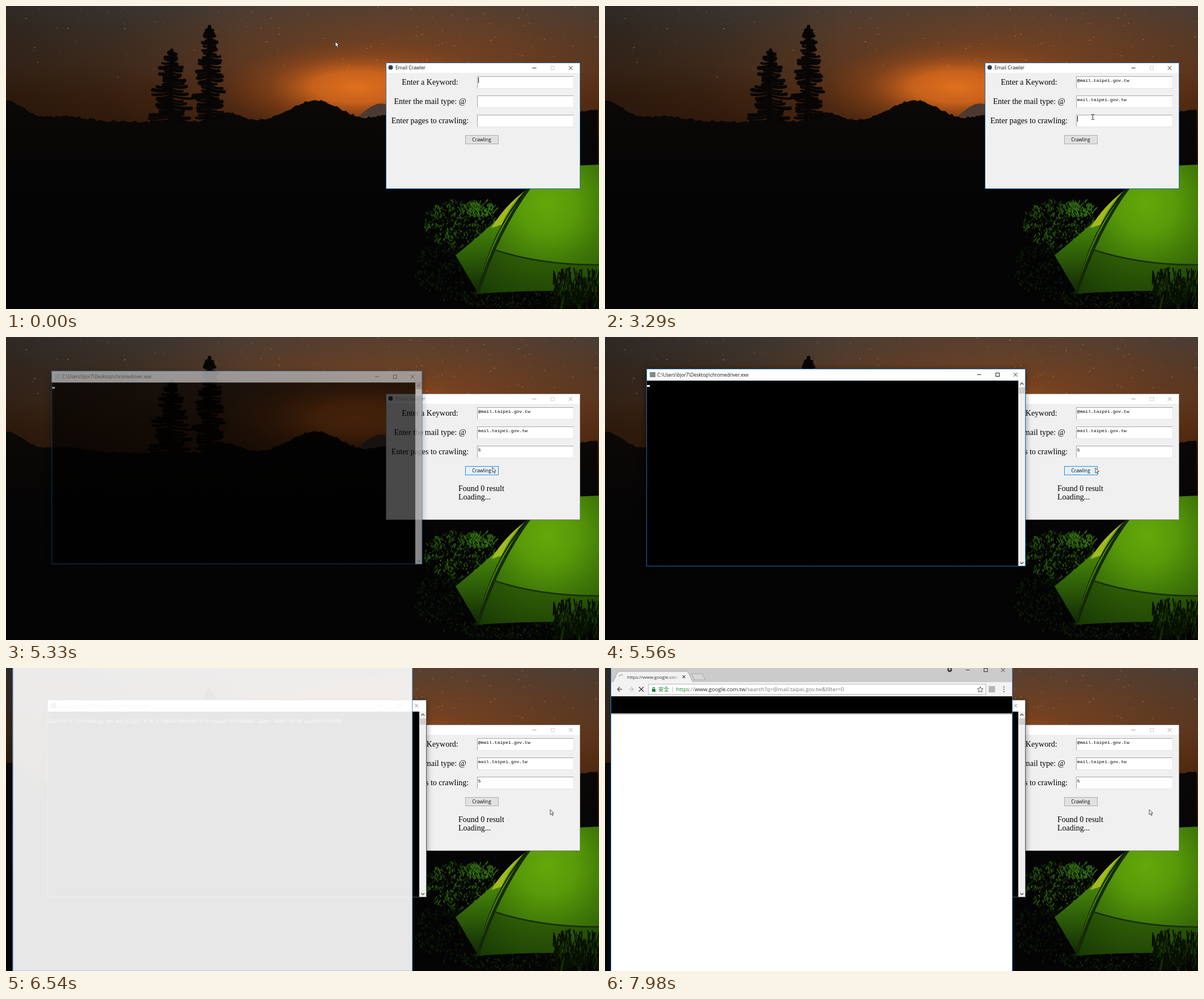
An HTML page with a canvas that plays this animation: 1046 px wide and 535 px high, repeating every 8000 ms.

```html
<!DOCTYPE html>
<html lang="en">
<head>
<meta charset="utf-8">
<title>Email Crawler</title>
<style>
html, body { margin: 0; width: 100%; height: 100%; overflow: hidden; background: #000; }
canvas { display: block; }
</style>
</head>
<body>
<canvas id="stage" width="1046" height="535"></canvas>
<script>
const W = 1046, H = 535, LOOP = 8000;
const SANS = '"Open Sans", sans-serif', SERIF = '"Liberation Serif", serif',
      MONO = '"Liberation Mono", monospace', CJK = '"Noto Sans CJK TC", "Noto Sans CJK", sans-serif';
const screen = document.getElementById('stage').getContext('2d');
let g = screen;

let seed = 7;
const rnd = (a = 0, b = 1) => {
  seed = (seed * 16807) % 2147483647;
  return a + (b - a) * seed / 2147483647;
};
const between = (v, a, b) => v >= a && v < b;
const smooth = p => p * p * (3 - 2 * p);

// ---- drawing helpers ----
function rect(x, y, w, h, fill) {
  g.fillStyle = fill;
  g.fillRect(x, y, w, h);
}
function frame(x, y, w, h, color) {
  g.strokeStyle = color;
  g.lineWidth = 1;
  g.strokeRect(x + .5, y + .5, w - 1, h - 1);
}
function shape(path, fill) {
  g.fillStyle = fill;
  g.fill(new Path2D(path));
}
function stroke(path, color, width = 1) {
  g.strokeStyle = color;
  g.lineWidth = width;
  g.stroke(new Path2D(path));
}
function arc(x, y, r, from, to, color, width = 1.2) {
  g.beginPath();
  g.arc(x, y, r, from, to);
  g.strokeStyle = color;
  g.lineWidth = width;
  g.stroke();
}
function disc(x, y, r, fill) {
  g.beginPath();
  g.arc(x, y, r, 0, 7);
  g.fillStyle = fill;
  g.fill();
}
function text(s, x, y, font, color, align = 'left') {
  g.font = font;
  g.fillStyle = color;
  g.textAlign = align;
  g.fillText(s, x, y);
  return x + g.measureText(s).width;
}
function cross(x, y, r, color, width = 1) {
  stroke(`M${x - r} ${y - r}l${2 * r} ${2 * r}m0 ${-2 * r}l${-2 * r} ${2 * r}`, color, width);
}
function controls(x, y, color, maxColor = color, gap = 32) {
  stroke(`M${x - 3.5} ${y + .5}h7`, color);
  frame(x + gap - 3, y - 3, 7, 7, maxColor);
  cross(x + 2 * gap, y + .5, 3.3, color);
}
// colours spread evenly over a gradient
function blend(gradient, ...colors) {
  colors.forEach((c, i) => gradient.addColorStop(i / (colors.length - 1), c));
  return gradient;
}
const down = (y0, y1, ...colors) => blend(g.createLinearGradient(0, y0, 0, y1), ...colors);
const across = (x0, x1, ...colors) => blend(g.createLinearGradient(x0, 0, x1, 0), ...colors);
const radial = (x, y, r, ...colors) => blend(g.createRadialGradient(x, y, 0, x, y, r), ...colors);

// ---- wallpaper ----
function glow(x, y, rx, ry, ...colors) {
  g.save();
  g.translate(x, y);
  g.scale(1, ry / rx);
  disc(0, 0, rx, radial(0, 0, rx, ...colors));
  g.restore();
}
function tree(x, top, base, spread) {
  const ink = '#080605';
  g.lineCap = 'round';
  stroke(`M${x} ${top}L${x - 4} ${base}`, ink, 6);
  for (let y = top + 6; y < base; y += 6) {
    for (const side of [-1, 1]) {
      const w = side * spread * Math.pow((y - top) / (base - top), .5) * rnd(.45, 1.05);
      stroke(`M${x} ${y - 3}q${w / 2} 5 ${w} ${rnd(1, 5)}`, ink, rnd(4, 7));
    }
  }
  g.lineCap = 'butt';
}
// hills as [centre, width, height]
const HILLS = [[0, 48, 36], [110, 45, 9], [390, 28, 17], [545, 60, 38], [690, 50, 12], [1040, 60, 20]];
function ridge() {
  let path = `M0 ${H}`;
  for (let x = 0; x <= W; x += 4) {
    const rise = HILLS.reduce((sum, [c, w, h]) => sum + h * Math.exp(-(((x - c) / w) ** 2)), 0);
    path += `L${x} ${204 - rise + rnd(-2, 2)}`;
  }
  shape(path + `L${W} ${H}`, down(165, 420, '#0b0806', '#060505', '#040404'));
}
function leaves(n, x, y, w, h, ...colors) {
  for (let i = 0; i < n; i++) {
    const a = rnd(0, 6.3), r = Math.sqrt(rnd()), len = rnd(2, 6);
    stroke(`M${x + w * r * Math.cos(a)} ${y + h * r * Math.sin(a)}l${rnd(-len, len)} ${-len}`, colors[i % colors.length], 2);
  }
}
function tent() {
  leaves(420, 800, 388, 64, 44, '#142c08', '#1f440c', '#2d5f10', '#0a1704');
  leaves(110, 835, 360, 30, 14, '#357012', '#28560e');
  leaves(150, 770, 465, 50, 45, '#0a1404', '#0e1c06');
  leaves(200, 900, 518, 130, 16, '#0a1404', '#13260a', '#0b1705');
  shape('M922 318Q880 370 793 440L832 506Q852 400 922 318', down(330, 500, '#5a9a0c', '#468509', '#2c5c08', '#142c05'));
  shape('M926 318L940 285L1046 280V505Q940 500 832 508Q852 400 926 318',
    radial(955, 350, 205, '#64a80a', '#589a09', '#417a08', '#2f5e07', '#1d4005'));
  shape('M862 431Q945 458 1046 457V505Q940 500 832 508Z', 'rgba(14,36,3,.35)');
  shape('M916 326Q880 352 856 392L874 386Q890 350 916 326', '#a2b91a');
  stroke('M924 320Q866 398 832 508', '#142a05', 5);
  stroke('M860 430Q945 458 1046 457', '#16300a', 2.5);
  for (let i = 0; i < 200; i++) {
    const x = rnd(965, 1055);
    stroke(`M${x} ${rnd(485, 540)}l${rnd(-9, 9)} ${-rnd(8, 32)}`, i % 5 ? '#081003' : '#152b06', 2.2);
  }
}
function wallpaper() {
  rect(0, 0, W, H, down(0, 215, '#423c38', '#463629', '#48301f', '#40230f', '#381c0c'));
  glow(720, 120, 560, 210, 'rgba(170,85,32,.6)', 'rgba(150,75,30,.3)', 'rgba(120,65,30,0)');
  glow(620, 143, 240, 84, '#e0701e', 'rgba(214,104,28,.85)', 'rgba(170,80,24,.35)', 'rgba(140,65,20,0)');
  rect(0, 0, 420, 230, across(0, 420, 'rgba(16,12,10,.4)', 'rgba(16,12,10,0)'));
  for (let i = 0; i < 150; i++) {
    stroke(`M${rnd(0, W)} ${rnd(0, 130)}l${rnd(.6, 3)} -.6`, `rgba(235,165,115,${rnd(.1, .6)})`, 1.2);
  }
  shape('M622 196Q645 172 662 172L700 180V200Z', '#4b3a31');
  ridge();
  tree(292, 78, 210, 44);
  tree(359, 36, 202, 32);
  tent();
}

// ---- form window ----
const MAIL = 'mail.taipei.gov.tw';
const inEntry = ({ x, y }) => between(x, 831, 1002) && between(y, 124, 214) && (y - 124) % 34 < 22;

function form(t, pos) {
  const active = t < 5230;
  rect(671, 100, 342, 223, '#f0f0f0');
  rect(671, 100, 342, 18, '#fff');
  frame(670, 100, 343, 223, active ? '#2b78b5' : '#8d8d8d');
  disc(678.5, 108.5, 4, '#30405c');
  text('Email Crawler', 687, 112, '8.3px ' + SANS, active ? '#111' : '#999');
  controls(932, 109, active ? '#222' : '#a0a0a0', '#d2d2d2');

  const label = '14px ' + SERIF;
  ['Enter a Keyword:', 'Enter the mail type: @', 'Enter pages to crawling:']
    .forEach((s, i) => text(s, 748, 139 + 34 * i, label, '#000', 'center'));

  const values = [t < 1370 ? '' : t < 1970 ? '@' : '@' + MAIL, t < 2690 ? '' : MAIL, t < 3920 ? '' : '5'];
  const row = t < 2440 ? 0 : t < 3250 ? 1 : 2;
  const caret = t < 890 || between(t, 1370, 3920) || between(t, 4220, 4530);
  values.forEach((s, i) => {
    const y = 124 + 34 * i;
    rect(831, y, 171, 22, '#e4e4e4');
    rect(831, y, 170, 21, '#a6a6a6');
    rect(832, y + 1, 169, 20, '#fff');
    const end = text(s, 832.8, y + 10, '8.07px ' + MONO, '#000');
    if (caret && row === i) rect(Math.round(end), y + 2, 1, 10, '#000');
  });

  const hover = between(pos.x, 810, 869) && between(pos.y, 227, 244);
  const pressed = between(t, 5000, 5080);
  rect(810, 228, 59, 16, pressed ? '#cce4f7' : hover ? '#e5f1fb' : '#e1e1e1');
  frame(810, 228, 59, 16, pressed ? '#005499' : hover ? '#2a8ddd' : '#adadad');
  text('Crawling', 839, 239, '8.4px ' + SANS, '#111', 'center');

  if (t >= 5080) {
    text('Found 0 result', 798, 271.5, label, '#000');
    text('Loading...', 798, 287, label, '#000');
  }
}

// ---- windows that fade in while growing ----
function popIn(t, start, cx, cy, draw) {
  const p = Math.min(1, Math.floor((t - start) / 88) * .27);
  if (p <= 0) return;
  const alpha = smooth(p), scale = .95 + .05 * alpha;
  g.save();
  g.globalAlpha = alpha;
  g.translate(cx, cy);
  g.scale(scale, scale);
  g.translate(-cx, -cy);
  draw(t);
  g.restore();
}

function terminal(t) {
  const active = t < 6200;
  g.save();
  g.shadowColor = 'rgba(0,0,0,.55)';
  g.shadowBlur = 11;
  g.shadowOffsetY = 2;
  rect(73, 56, 668, 349, '#000');
  g.restore();
  rect(73, 56, 668, 21, '#fff');
  rect(729, 77, 12, 328, '#f0f0f0');
  rect(730, 89, 11, 11, '#cdcdcd');
  stroke('M732.5 84l2.8 -2.8l2.8 2.8M732.5 397.5l2.8 2.8l2.8 -2.8', '#444', 1.2);
  frame(73, 56, 669, 349, active ? '#1c6cae' : '#555');
  rect(79, 62, 10, 9, '#7f8c8c');
  text('C:\\Users\\bjor7\\Desktop\\chromedriver.exe', 92, 69.5, '8.25px ' + SANS, active ? '#111' : '#999');
  controls(660, 66, active ? '#222' : '#888');
  if (t < 5700) rect(74, 85, 5, 3, '#fff');
  else text('DevTools listening on ws://127.0.0.1:8956/devtools/browser/187968e6-a3cc-4665-92c8-4add277202f0',
    73.5, 97, '9.11px ' + MONO, '#c4c4c4');
}

function browser(t) {
  rect(10, -8, 708.5, 545, '#fff');
  if (t >= 6450) frame(10, -8, 709, 545, '#2a7fc4');
  if (t < 7270) return;
  const tab = 'M14 25L22 8L25 6H144L147 8L155 25', newTab = 'M152 10h19l6 11h-19z';
  rect(11, 0, 707, 25, '#cbcbcb');
  shape(tab, '#f2f2f2');
  stroke(tab, '#a8a8a8');
  shape(newTab, '#d6d6d6');
  stroke(newTab, '#a5a5a5');
  disc(608, 3, 4.2, '#444');
  disc(608, 2, 1.7, '#ccc');
  controls(640, 3, '#333', '#333', 31);

  rect(11, 25, 707, 25, '#f2f2f2');
  stroke('M30 37.5H22M26 33.5l-4 4l4 4', '#555', 1.3);
  stroke('M42 37.5h8M46 33.5l4 4l-4 4', '#c4c4c4', 1.3);
  rect(76, 28, 596, 19, '#fff');
  frame(76, 28, 596, 19, '#b9b9b9');
  if (t < 7670) blankPage();
  else loadingPage(t);
  cross(139, 15.5, 2.4, '#444', 1.2);
  stroke('M662 33l1.5 3.3l3.5 .4l-2.6 2.4l.8 3.6l-3.2 -1.8l-3.2 1.8l.8 -3.6l-2.6 -2.4l3.5 -.4z', '#555');
  rect(677, 32, 11, 11, '#b4b4b4');
  for (let i = -1; i < 2; i++) disc(703.5, 37.5 + 4 * i, 1.1, '#555');

  if (t < 7350) return;
  rect(11, 50, 707, 30, t < 7750 ? '#f2f2f2' : '#000');
  rect(11, 80, 707, 3, down(80, 83, '#999', '#fff'));
}
function blankPage() {
  text('data:,', 28, 18.5, '8px ' + SANS, '#333');
  arc(64, 37.5, 4, .4, 5.6, '#555');
  text('data:,', 84, 41, '9.6px ' + SANS, '#222');
}
function loadingPage(t) {
  const turn = 3.4 + (t - LOOP) / 180, font = '9.6px ' + SANS;
  arc(29, 16, 4, turn, turn + 2, '#999');
  text('https://www.google.com', 39, 18.5, '8px ' + SANS, across(118, 131, '#333', 'rgba(51,51,51,0)'));
  cross(64, 37.5, 4, '#444', 1.5);
  rect(83, 37, 6, 5, '#188038');
  frame(84, 34, 4, 5, '#188038');
  text('安全', 94, 41, '9.5px ' + CJK, '#188038');
  rect(119, 33, 1, 10, '#bbb');
  let x = text('https', 125.5, 41, font, '#188038');
  x = text('://', x, 41, font, '#888');
  x = text('www.google.com.tw', x, 41, font, '#222');
  text(`/search?q=@${MAIL}&filter=0`, x, 41, font, '#777');
}

// ---- pointer: start, end, x, y; one step about every 75 ms ----
const MOVES = [
  [290, 740, 843, 138], [1370, 1740, 854, 143], [1970, 2440, 861, 168], [2690, 2830, 860, 182],
  [2980, 3060, 860, 196], [4450, 4850, 843, 228], [5000, 5560, 865, 231], [5630, 5780, 960, 250]
];
function pointerAt(t) {
  let x = 581, y = 63;
  for (const [from, to, u, v] of MOVES) {
    if (t < from) break;
    const gaps = Math.round((to - from) / 75);
    const step = Math.floor(Math.min(1, (t - from) / (to - from)) * gaps);
    const e = smooth((step + 1) / (gaps + 1));
    x += (u - x) * e;
    y += (v - y) * e;
  }
  return { x: Math.round(x), y: Math.round(y) };
}
function pointer(pos, t) {
  g.save();
  g.translate(pos.x, pos.y);
  if (inEntry(pos)) {
    stroke('M-2 -4.5h2m1 0h2M-2 4.5h2m1 0h2M.5 -4v8', '#222');
  } else {
    const arrow = 'M0 0v9l2 -1.8l1.6 3.3l1.4 -.7l-1.4 -3.2l2.6 -.2z';
    shape(arrow, '#fff');
    stroke(arrow, '#222', .8);
  }
  if (between(t, 5780, 6110)) {
    const turn = t < 5930 ? 0 : 2;
    arc(7, .5, 3.2, 0, 6.3, '#8cc8f0', 1.6);
    arc(7, .5, 3.2, turn, turn + 2, '#1c7cc8', 1.6);
  }
  g.restore();
}

// ---- scene ----
const backdrop = document.createElement('canvas');
backdrop.width = W;
backdrop.height = H;
g = backdrop.getContext('2d');
wallpaper();
g = screen;

function render(t) {
  g.drawImage(backdrop, 0, 0);
  const pos = pointerAt(t);
  form(t, pos);
  popIn(t, 5142, 407, 231, terminal);
  popIn(t, 6272, 364, 264.5, browser);
  pointer(pos, t);
}
function tick() {
  render(performance.now() % LOOP);
  requestAnimationFrame(tick);
}
tick();
</script>
</body>
</html>
```
